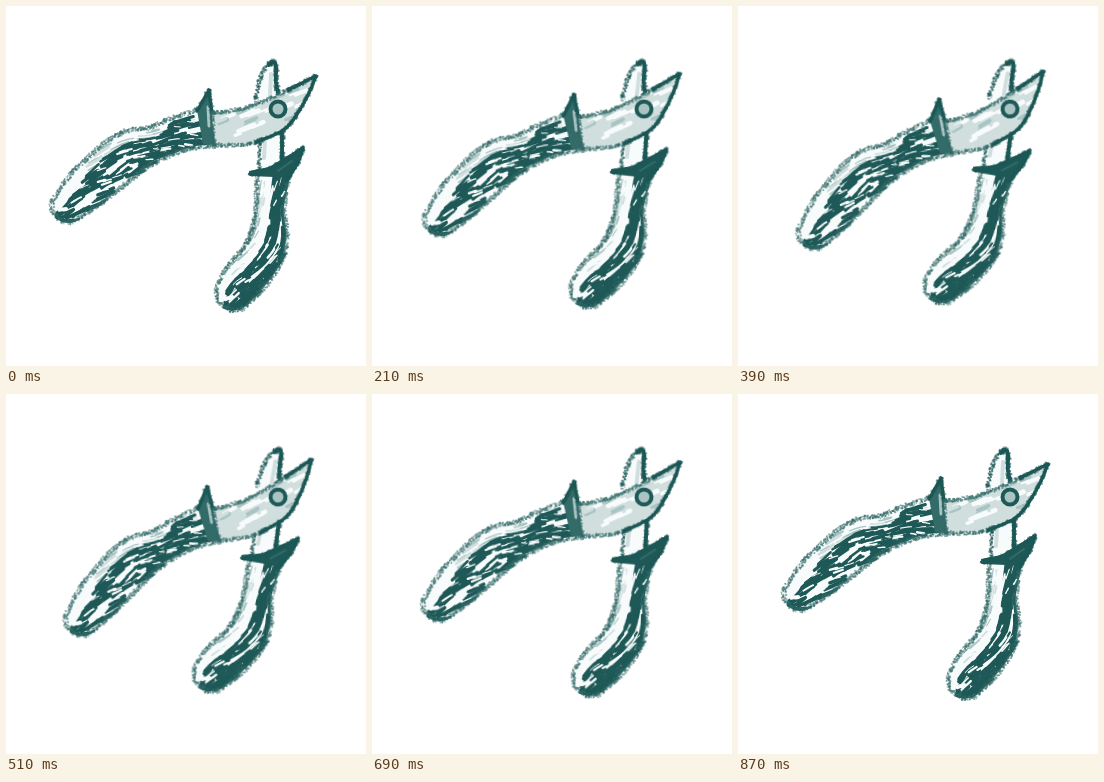
Write an HTML page with a canvas that moves like this. It is 360x360 px and loops after 900 ms.

```html
<!DOCTYPE html>
<html lang="en">
<head>
<meta charset="utf-8">
<title>Pruning shears</title>
<style>
html, body { margin: 0; width: 100%; height: 100%; overflow: hidden; background: #fff; }
canvas { display: block; width: 360px; height: 360px; }
</style>
</head>
<body>
<canvas id="stage" width="360" height="360"></canvas>
<script>
const SIZE = 360, LOOP = 900, STEP = 30, SWING = 7.75 * Math.PI / 180;
const PIVOT = [272, 103];
const DARK = '#1e5957', EDGE = '#336b69', GREY = '#a9c4c2', PALE = '#d0dfde', WHITE = '#f8fbfb';

let seed = 7;
const random = (low = 0, high = 1) => {
  seed = (seed * 16807) % 2147483647;
  return low + (high - low) * seed / 2147483647;
};
const points = text => text.split(' ').map(s => s.split(',').map(Number));

// Catmull-Rom samples about one pixel apart; a doubled point makes a corner
function curve(p) {
  const last = p.length - 1, out = [];
  for (let i = 0; i < last; i++) {
    const a = p[Math.max(i - 1, 0)], b = p[i], c = p[i + 1], d = p[Math.min(i + 2, last)];
    const n = Math.round(Math.hypot(c[0] - b[0], c[1] - b[1]));
    for (let j = 0; j < n; j++) {
      const t = j / n;
      out.push(b.map((_, k) => b[k] + t / 2 * (c[k] - a[k]
        + t * (2 * a[k] - 5 * b[k] + 4 * c[k] - d[k] + t * (3 * (b[k] - c[k]) + d[k] - a[k])))));
    }
  }
  return [...out, p[last]];
}

class Sketch {
  constructor() {
    this.canvas = document.createElement('canvas');
    this.canvas.width = this.canvas.height = SIZE;
    this.g = this.canvas.getContext('2d');
    this.g.lineCap = this.g.lineJoin = 'round';
  }

  trace(p) {
    this.g.beginPath();
    p.forEach(q => this.g.lineTo(q[0], q[1]));
  }

  fill(color, p) {
    this.trace(p);
    this.g.fillStyle = color;
    this.g.fill();
  }

  line(color, width, p) {
    this.trace(p);
    this.g.strokeStyle = color;
    this.g.lineWidth = width;
    this.g.stroke();
  }

  // soft grain scattered along a curve
  crayon(color, width, p) {
    this.g.fillStyle = color;
    this.g.globalAlpha = 0.5;
    for (const [x, y] of curve(p)) for (let i = 0; i < width * 0.6; i++) {
      const a = random(0, 6.283), r = Math.sqrt(random()) * width / 2;
      this.g.beginPath();
      this.g.arc(x + Math.cos(a) * r, y + Math.sin(a) * r, random(0.6, 1.3), 0, 7);
      this.g.fill();
    }
    this.g.globalAlpha = 1;
  }

  edge(width, text) {
    const p = points(text);
    this.line(DARK, width * 0.7, curve(p));
    this.crayon(DARK, width, p);
  }

  // keys: x, y, half width from the round end to the guard; side +1 is the lit one
  grip(keys, shadeLimit) {
    const spine = curve(points(keys)), n = spine.length;
    const at = (i, side) => {
      const k = Math.max(0, Math.min(n - 1, Math.round(i)));
      const a = spine[Math.max(k - 3, 0)], b = spine[Math.min(k + 3, n - 1)];
      const angle = Math.atan2(b[1] - a[1], b[0] - a[0]);
      const r = side * spine[k][2] * Math.sqrt(1 - Math.max(0, 1 - k / 13) ** 2);
      return [spine[k][0] + Math.sin(angle) * r, spine[k][1] - Math.cos(angle) * r];
    };
    const streak = (color, width, i, side, length, drift) =>
      this.line(color, width, [0, 0.33, 0.67, 1].map(t => at(i + t * length, side + t * drift)));

    const outline = [...spine.map((_, i) => at(n - 1 - i, 1)), ...spine.map((_, i) => at(i, -1))];
    this.fill(WHITE, outline);
    for (let i = 0; i < 18; i++) {
      streak(random() < 0.5 ? PALE : GREY, random(1, 2.5), random(0.15, 0.85) * n, random(0.5, 0.95), random(8, 22), -0.1);
    }
    for (let i = 0; i < 120; i++) {
      const u = random(), length = random(12, 26);
      streak(DARK, random(2, 4), u * n - length / 2, random(-0.9, shadeLimit(u)), length, random(-0.25, 0.05));
    }
    for (let i = 0; i < 30; i++) {
      streak(WHITE, random(0.8, 2.4), random(0.03, 0.9) * n, random(-0.75, 0.75), random(4, 12), -0.15);
    }
    streak(WHITE, 4, 9, 0.25, 5, -0.3);
    this.crayon(EDGE, 5, outline);
  }
}

const upright = new Sketch();
upright.fill(WHITE, curve(points('250,98 253,79 262,58 270,57 271,80 277,150 277,150 254,166 255,128')));
upright.line(PALE, 4, points('265,68 264,90'));
upright.line(PALE, 4, points('259,134 258,152'));
upright.crayon(DARK, 4.5, points('250,94 252,80 257,66 264,56 268,55'));
upright.crayon(DARK, 4, points('254,134 253,164'));
upright.edge(5.5, '263,59 268,56 270,62 270,76 274,95');
upright.edge(5.5, '276,122 276,153');
upright.grip('219,301,14 234,278,20 255,252,20 263,229,18 264,202,14 267,168,16', u => 0.55 - 0.65 * u);
upright.fill(DARK, points('243,165 263,161 298,140 293,156 283,172 268,171 244,170'));
upright.edge(5, '244,168 262,164 280,153 297,142 297,142 292,156 281,174');
upright.line(EDGE, 2, points('272,165 286,155'));

const slanted = new Sketch();
slanted.grip('51,211,13 75,187,20 92,172,22 122,148,22 148,138,17 172,128,17 200,121,19', u => 0.4 + 0.5 * u * u);

const blade = curve(points('207,107 235,103 285,83 311,69 311,69 301,92 286,115 258,134 235,139 207,138'));
slanted.fill(PALE, blade);
slanted.g.save();
slanted.trace(blade);
slanted.g.clip();
for (let i = 0; i < 34; i++) {
  const x = random(208, 298), y = 122 - (x - 208) * 0.3 + random(-14, 14), length = random(5, 14);
  const color = random() < 0.5 ? GREY : random() < 0.6 ? WHITE : PALE;
  slanted.line(color, random(3, 5.5), [[x, y], [x + length, y - length * 0.4]]);
}
slanted.g.restore();
slanted.crayon(EDGE, 4, points('207,107 235,103 258,95 284,83'));
slanted.crayon(EDGE, 4.5, points('207,139 235,139 256,134'));
slanted.edge(4.5, '282,84 310,70 310,70 301,91 287,114 274,126 250,136');

// pivot screw
slanted.g.beginPath();
slanted.g.arc(...PIVOT, 7.5, 0, 7);
slanted.g.fillStyle = GREY;
slanted.g.fill();
slanted.g.strokeStyle = DARK;
slanted.g.lineWidth = 4;
slanted.g.stroke();

slanted.fill(EDGE, points('191,104 203,84 209,139 197,138'));
slanted.line(GREY, 3, points('202,101 203,120'));
slanted.edge(4.5, '191,105 203,84 203,84 206,106');
slanted.crayon(EDGE, 4.5, points('206,106 208,141'));

const stage = document.getElementById('stage').getContext('2d');

function drawPart(part, angle) {
  stage.save();
  stage.translate(...PIVOT);
  stage.rotate(angle);
  stage.drawImage(part.canvas, -PIVOT[0], -PIVOT[1]);
  stage.restore();
}

function frame() {
  const time = Math.floor(performance.now() % LOOP / STEP) * STEP;
  const half = (LOOP - STEP) / 2;
  const u = 1 - Math.abs(time / half - 1);
  const angle = SWING * u * u * (3 - 2 * u);
  stage.fillStyle = '#fff';
  stage.fillRect(0, 0, SIZE, SIZE);
  drawPart(upright, angle);
  drawPart(slanted, -angle);
  requestAnimationFrame(frame);
}
frame();
</script>
</body>
</html>
```
